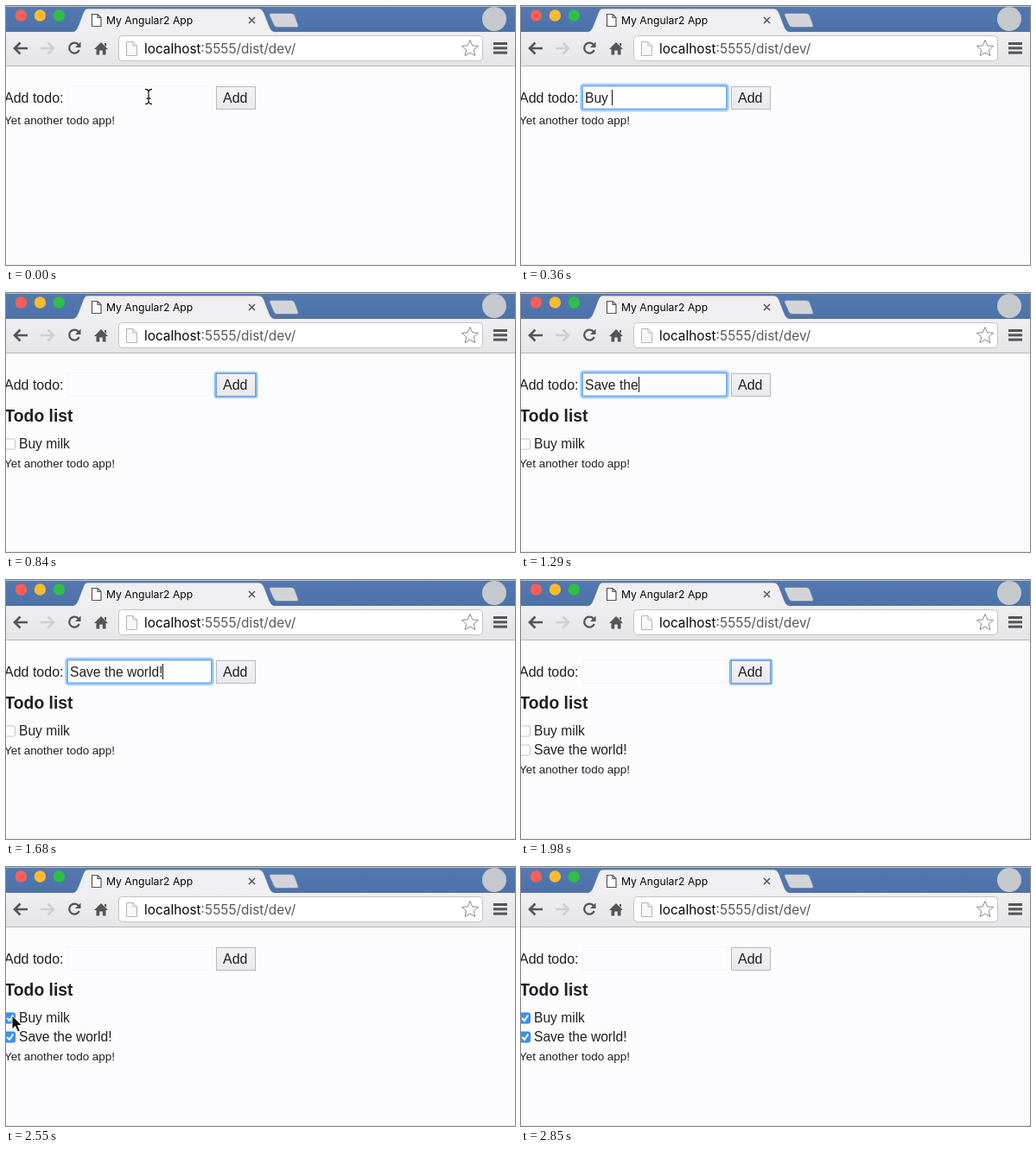
An HTML page with a canvas that plays this animation: 589x300 px, repeating every 2880 ms.

```html
<!DOCTYPE html>
<html lang="en">
<head>
<meta charset="utf-8">
<title>Todo app</title>
<style>
html, body { margin: 0; width: 100%; height: 100%; overflow: hidden; background: #fcfcfe; }
canvas { display: block; width: 589px; height: 300px; }
</style>
</head>
<body>
<canvas id="stage" width="589" height="300"></canvas>
<script>
const ctx = document.getElementById('stage').getContext('2d');
const LOOP = 2880, STEP = 30;
const SANS = '"Liberation Sans", Arial, sans-serif';
const UI = 'Inter, Roboto, sans-serif';
const INK = '#202020';

function text(str, x, y, size, color = INK, family = SANS, weight = 400) {
  ctx.font = `${weight} ${size}px ${family}`;
  ctx.fillStyle = color;
  ctx.fillText(str, x, y);
  return x + ctx.measureText(str).width;
}

function rect(x, y, w, h, color) {
  ctx.fillStyle = color;
  ctx.fillRect(x, y, w, h);
}

function round(x, y, w, h, r, fill, stroke, width = 1) {
  ctx.beginPath();
  ctx.roundRect(x, y, w, h, r);
  paint(fill, stroke, width);
}

function disc(x, y, r, color) {
  ctx.beginPath();
  ctx.arc(x, y, r, 0, Math.PI * 2);
  paint(color);
}

function path(d, fill, stroke, width = 1) {
  const p = new Path2D(d);
  if (fill) { ctx.fillStyle = fill; ctx.fill(p); }
  if (stroke) { ctx.strokeStyle = stroke; ctx.lineWidth = width; ctx.stroke(p); }
}

function paint(fill, stroke, width) {
  if (fill) { ctx.fillStyle = fill; ctx.fill(); }
  if (stroke) { ctx.strokeStyle = stroke; ctx.lineWidth = width; ctx.stroke(); }
}

function fade(y0, y1, from, to) {
  const g = ctx.createLinearGradient(0, y0, 0, y1);
  g.addColorStop(0, from);
  g.addColorStop(1, to);
  return g;
}

function star(cx, cy, r) {
  ctx.beginPath();
  for (let i = 0; i < 10; i++) {
    const a = i * Math.PI / 5 - Math.PI / 2, d = i % 2 ? r * 0.45 : r;
    ctx.lineTo(cx + d * Math.cos(a), cy + d * Math.sin(a));
  }
  ctx.closePath();
  paint('#fff', '#8a8a8a', 1);
}

function browser() {
  rect(0, 0, 589, 30, fade(0, 30, '#5479b0', '#4c72aa'));
  rect(0, 0, 589, 1, '#b4c2c8');
  disc(17.4, 11, 6.7, '#fb5f57');
  disc(39.4, 11, 6.7, '#fcbb2f');
  disc(61.4, 11, 6.7, '#2fbf45');
  disc(565, 15, 14, '#c5c8cc');

  rect(0, 30, 589, 39, fade(30, 69, '#efeef0', '#e5e4e7'));
  rect(0, 29, 589, 1, '#5a7299');
  rect(0, 69, 589, 1, '#b8b8ba');
  const tab = 'M76 30 C81 29.5 82 27 84 22 L89 9 C91 4 92 3 96 3 H291 C295 3 297 4 299 9 L304 22 C306 27 307 29.5 312 30';
  path(tab, '#efeef0', '#56749f', 0.7);
  rect(77, 30, 234, 1, '#efeef0');
  path('M307 8.5 H330 Q333 8.5 334 11 L338 22 Q339 24.5 336 24.5 H314 Q311 24.5 310 22 L305 11 Q304 8.5 307 8.5 Z', '#d2d4d8', '#7488a4', 0.8);

  path('M99.5 9.5 H106 L110 13.5 V23.5 H99.5 Z M106 9.5 V13.5 H110', '#fff', '#555', 1.2);
  text('My Angular2 App', 116, 21, 12.2, '#080808', UI);
  path('M281 13 L288 20 M288 13 L281 20', null, '#555', 1.5);

  path('M25 49 H10 M16.5 42.5 L10 49 L16.5 55.5', null, '#555', 2.7);
  path('M40 49 H55 M48.5 42.5 L55 49 L48.5 55.5', null, '#cfcfcf', 2.7);
  path('M84 45 A6 6 0 1 0 84.7 51', null, '#555', 2.3);
  path('M86.5 41.5 V48 H80 Z', '#555');
  path('M102 50 L110 42 L118 50 H115.5 V56.5 H111.8 V51.5 H108.2 V56.5 H104.5 V50 Z M114 43 H116 V47 L114 45 Z', '#555');

  round(130.5, 34.5, 421, 29, 4, '#fff', '#c4c4c6');
  path('M139.5 41.5 H147 L151.5 46 V57.5 H139.5 Z M147 41.5 V46 H151.5', '#f8f8f8', '#b4b4b4', 1);
  const x = text('localhost', 160, 55, 15.37, '#080808', UI);
  text(':5555/dist/dev/', x, 55, 15.37, '#585858', UI);
  star(537, 49.5, 10);
  for (const y of [42, 47.3, 52.6]) rect(564, y, 16, 3, '#555');
}

function input(str, focused, caret) {
  if (focused) {
    round(70, 91.5, 169, 29, 2.5, null, '#b5d5fa', 4);
    round(71, 92.5, 167, 27, 1.5, '#fff', '#70b0f2', 2);
  } else {
    ctx.strokeStyle = '#f6f6f2';
    ctx.lineWidth = 1;
    ctx.strokeRect(71.5, 92.5, 167, 27);
  }
  const end = text(str, 74, 111.5, 15.6);
  if (caret) rect(Math.round(end), 97, 1, 18, '#111');
}

function button(focused, pressed) {
  if (focused) round(242, 92.5, 48, 28, 2, null, '#8dbbee', 2.5);
  rect(243, 93, 46, 27, pressed ? '#dcdce2' : fade(93, 120, '#f3f2f6', '#e9e8ee'));
  ctx.strokeStyle = focused ? '#6c9fd6' : '#b9b9bd';
  ctx.lineWidth = 1;
  ctx.strokeRect(243.5, 93.5, 45, 26);
  text('Add', 251, 111.5, 16);
}

function todo(label, y, done) {
  round(-1.5, y - 6, 12, 12, 2, done ? '#3b93f4' : '#fff', done ? '#2f80dc' : '#c4c4c4');
  if (done) path(`M1.3 ${y} L4 ${y + 3} L8.3 ${y - 3.5}`, null, '#fff', 1.9);
  text(label, 15, y + 5, 15.6);
}

function beam(x, y) {
  path(`M${x - 4} ${y - 8.5} Q${x} ${y - 8.5} ${x} ${y - 5} V${y + 5} Q${x} ${y + 8.5} ${x - 4} ${y + 8.5}
        M${x + 4} ${y - 8.5} Q${x} ${y - 8.5} ${x} ${y - 5} M${x} ${y + 5} Q${x} ${y + 8.5} ${x + 4} ${y + 8.5}
        M${x - 2.5} ${y + 2} H${x + 2.5}`, null, '#222', 1.3);
}

function arrow(x, y) {
  ctx.save();
  ctx.translate(x, y);
  path('M0 0 V16 L3.7 12.6 L6.6 19 L9.4 17.8 L6.6 11.5 H11.5 Z', '#111', '#fff', 1);
  ctx.restore();
}

const within = (t, a, b) => t >= a && t < b;

function typed(str, t, start, pace) {
  return str.slice(0, Math.max(0, Math.floor((t - start) / pace)));
}

function glide(t, a, b, from, to) {
  let k = Math.min(1, Math.max(0, (t - a) / (b - a)));
  k = k * k * (3 - 2 * k);
  return from.map((v, i) => v + (to[i] - v) * k);
}

function pointer(t) {
  if (t < 180) beam(165, 105);
  if (!within(t, 2040, 2730)) return;
  const low = [7, 194], high = [7, 172];
  if (t < 2220) arrow(...glide(t, 2040, 2190, [75, 235], low));
  else if (t < 2550) arrow(...glide(t, 2340, 2460, low, high));
  else arrow(...glide(t, 2550, 2730, high, [-14, 205]));
}

function draw(t) {
  rect(0, 0, 589, 300, '#fcfcfe');
  browser();

  const first = within(t, 150, 630), second = within(t, 930, 1800);
  let str = '';
  if (t < 720) str = typed('Buy milk', t, 180, 42);
  else if (within(t, 930, 1890)) str = typed('Save the world!', t, 960, 40);
  const items = t < 720 ? 0 : t < 1890 ? 1 : 2;

  text('Add todo:', -2, 111.5, 16);
  input(str, first || second, first || second);
  button(within(t, 630, 930) || within(t, 1800, 2250), within(t, 690, 750) || within(t, 1860, 1920));

  if (items) {
    text('Todo list', -1.5, 149, 19.3, INK, SANS, 700);
    todo('Buy milk', 175, t >= 2490);
  }
  if (items > 1) todo('Save the world!', 197, t >= 2250);
  text('Yet another todo app!', -2, [137, 202, 224][items], 13.45);

  rect(0, 299, 589, 1, '#ecece2');
  pointer(t);
}

const begin = performance.now();
function tick() {
  const t = (performance.now() - begin) % LOOP;
  draw(Math.floor(t / STEP) * STEP);
  requestAnimationFrame(tick);
}
tick();
</script>
</body>
</html>
```
